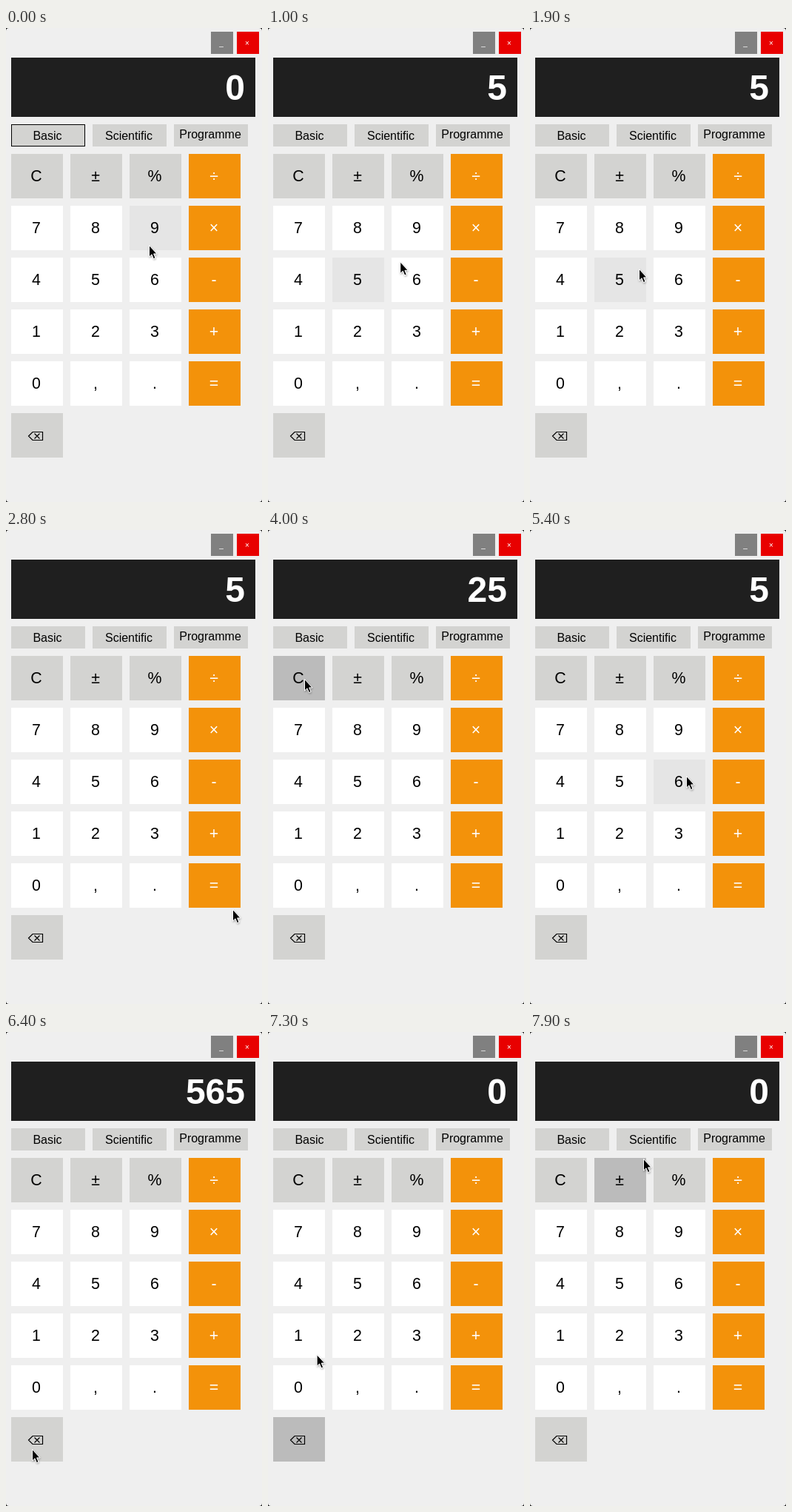
An HTML page for the animation above (8000 ms loop, 346 by 640 pixels).

```html
<!DOCTYPE html>
<html lang="en">
<head>
<meta charset="utf-8">
<title>Calculator</title>
<style>
html, body { margin: 0; width: 100%; height: 100%; overflow: hidden; background: #1b1b1b; }
svg { display: block; width: 346px; height: 640px; }
text { font-family: "Liberation Sans", Arial, sans-serif; text-anchor: middle; }
</style>
</head>
<body>
<svg id="stage" viewBox="0 0 346 640">
  <defs>
    <filter id="shade" x="-50%" y="-50%" width="200%" height="200%">
      <feDropShadow dx="0.5" dy="1.3" stdDeviation="1" flood-opacity="0.35"/>
    </filter>
  </defs>
</svg>
<script>
const LOOP = 8000, STEP = 100;
const KEY_W = 70, KEY_H = 60, GAP = 10, LEFT = 7;
const GREY = '#d3d3d1', WHITE = '#ffffff', ORANGE = '#f3920a';
const HOVER = { [GREY]: '#bbbbbb', [WHITE]: '#e5e5e5', [ORANGE]: '#ffb008' };
const svg = document.getElementById('stage');

function add(tag, attrs, content = '') {
  const el = document.createElementNS('http://www.w3.org/2000/svg', tag);
  for (const name in attrs) el.setAttribute(name, attrs[name]);
  el.textContent = content;
  return svg.appendChild(el);
}

function box(x, y, width, height, fill) {
  return add('rect', { x, y, width, height, fill });
}

function label(text, x, y, size, fill = '#000') {
  return add('text', { x, y, 'font-size': size, fill }, text);
}

// Window and title buttons
add('rect', { width: 346, height: 640, rx: 4, fill: '#efefef' });
[['_', '#808080'], ['×', '#e80000']].forEach(([char, fill], i) => {
  const x = 277 + i * 35;
  box(x, 5, 30, 30, fill);
  label(char, x + 14, 24, 10, '#fff');
});

// Display
box(LEFT, 40, 330, 80, '#1f1f1f');
const display = label('0', 323, 97, 48, '#fff');
display.setAttribute('font-weight', 'bold');
display.style.textAnchor = 'end';

// Mode tabs
['Basic', 'Scientific', 'Programme'].forEach((name, i) => {
  const x = LEFT + i * 110;
  box(x, 130, 100, 30, GREY);
  label(name, x + 49, i < 2 ? 151 : 149, 16);
});
const focus = add('rect', { x: 7.5, y: 130.5, width: 99, height: 29, fill: 'none', stroke: '#000' });

// Keypad
const keys = {};
['C±%÷', '789×', '456-', '123+', '0,.=', '⌫'].forEach((row, r) => {
  [...row].forEach((char, c) => {
    const x = LEFT + c * (KEY_W + GAP), y = 170 + r * (KEY_H + GAP);
    const fill = c === 3 ? ORANGE : r % 5 === 0 ? GREY : WHITE;
    keys[char] = { x, y, fill, el: box(x, y, KEY_W, KEY_H, fill) };
    if (char !== '⌫') label(char, x + 34, y + 37, 21.33, c === 3 ? '#fff' : '#000');
  });
});
add('path', {
  d: 'M30.5 551 L36 545.5 H49.5 V556.5 H36 Z M38.5 547.5 l7 7 m0 -7 l-7 7',
  fill: 'none', stroke: '#000', 'stroke-width': 1.2
});

const pointer = add('path', {
  d: 'M0.5 0.5 V16 L4 12.8 L6.4 18.6 L9 17.5 L6.6 11.9 H11 Z',
  fill: '#000', stroke: '#fff', 'stroke-width': 1, filter: 'url(#shade)'
});

// Key visited, arrival, departure, value shown on departure, offset from the key's centre
const visits = [
  ['9', 0, 0, '0', -9, 23],
  ['5', 700, 800, '5'],
  ['×', 1300, 1500, '5'],
  ['5', 1800, 2300, '5', 25, -15],
  ['=', 2700, 2800, '5', 24, 32],
  ['=', 3100, 3200, '25'],
  ['C', 3900, 4200, '0', 7, 1],
  ['5', 4800, 4900, '5'],
  ['6', 5300, 5600, '56', 9, -8],
  ['5', 5900, 6000, '565'],
  ['⌫', 6300, 6300, '565', 42, 25],
  ['⌫', 6400, 6600, '56', -7, 13],
  ['⌫', 6600, 6800, '5', -7, 13],
  ['⌫', 6800, 7100, '0', -7, 13],
  ['±', 7600, 7800, '0'],
  ['±', 7900, LOOP, '0', 31, -29]
].map(([char, arrive, leave, shown, dx = 0, dy = 0]) => ({
  arrive, leave, shown,
  x: keys[char].x + KEY_W / 2 + dx,
  y: keys[char].y + KEY_H / 2 + dy
}));

function lastVisit(t) {
  return visits.findLastIndex(v => v.leave <= t);
}

function pointerAt(t) {
  const i = lastVisit(t), a = visits[i], b = visits[i + 1];
  const p = Math.min(1, (t - a.leave) / (b.arrive - a.leave || 1));
  const e = p * p * (3 - 2 * p);
  return [a.x + (b.x - a.x) * e, a.y + (b.y - a.y) * e];
}

function draw(time) {
  const t = Math.floor((time % LOOP + 0.5) / STEP) * STEP % LOOP;
  const [x, y] = pointerAt(t);
  // Key highlights trail the pointer by one step
  const [hx, hy] = pointerAt(Math.max(0, t - STEP));
  pointer.setAttribute('transform', `translate(${x.toFixed(1)} ${y.toFixed(1)})`);
  for (const k of Object.values(keys)) {
    const over = hx >= k.x && hx < k.x + KEY_W && hy >= k.y && hy < k.y + KEY_H;
    k.el.setAttribute('fill', over ? HOVER[k.fill] : k.fill);
  }
  const last = lastVisit(t);
  display.textContent = visits[last].shown;
  focus.setAttribute('visibility', last ? 'hidden' : 'visible');
}

const start = performance.now();
function tick() {
  draw(performance.now() - start);
  requestAnimationFrame(tick);
}
tick();
</script>
</body>
</html>
```
